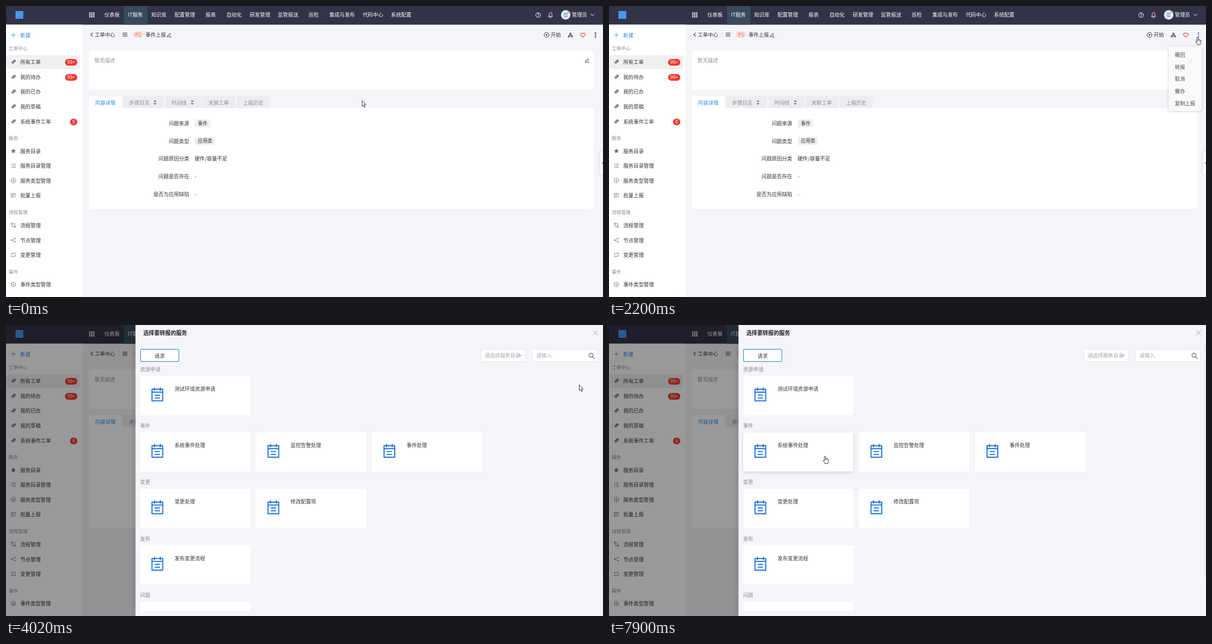
An HTML page with a canvas for the animation above (8 s loop, 1072 by 522 pixels).

```html
<!DOCTYPE html>
<html lang="zh-CN">
<head>
<meta charset="utf-8">
<title>工单中心</title>
<style>
html, body { margin: 0; width: 100%; height: 100%; overflow: hidden; background: #f4f5f9; }
canvas { display: block; }
</style>
</head>
<body>
<canvas id="stage" width="1072" height="522"></canvas>
<script>
const ctx = document.getElementById('stage').getContext('2d');
const LOOP = 8000, MENU_AT = 1960, DRAWER_AT = 4020;
const FONT = '"Noto Sans CJK SC", "Noto Sans CJK", "Noto Sans", sans-serif';
const INK = '#333', GRAY = '#8a8c90', BLUE = '#2d84e8', BG = '#f4f5f9', RED = '#f0372e';

function text(s, x, y, color = INK, size = 9.17, align = 'left', weight = 400) {
  ctx.font = `${weight} ${size}px ${FONT}`;
  ctx.textAlign = align;
  ctx.fillStyle = color;
  ctx.fillText(s, x, y + size * 0.37);
}

function box(x, y, w, h, fill, r = 0, line) {
  ctx.beginPath();
  ctx.roundRect(x, y, w, h, r);
  ctx.fillStyle = fill;
  ctx.fill();
  if (line) {
    ctx.strokeStyle = line;
    ctx.lineWidth = 1;
    ctx.stroke();
  }
}

function shadowBox(x, y, w, h, fill, r, blur, alpha, dy = 1) {
  ctx.save();
  ctx.shadowColor = `rgba(0,0,0,${alpha})`;
  ctx.shadowBlur = blur;
  ctx.shadowOffsetY = dy;
  box(x, y, w, h, fill, r);
  ctx.restore();
}

function dot(x, y, r, fill) {
  ctx.beginPath();
  ctx.arc(x, y, r, 0, Math.PI * 2);
  ctx.fillStyle = fill;
  ctx.fill();
}

// Path around (x, y): outlined, filled, or both
function icon(d, x, y, stroke, width = 1, fill) {
  const p = new Path2D(d);
  ctx.save();
  ctx.translate(x, y);
  ctx.lineJoin = ctx.lineCap = 'round';
  if (fill) { ctx.fillStyle = fill; ctx.fill(p); }
  if (stroke) { ctx.strokeStyle = stroke; ctx.lineWidth = width; ctx.stroke(p); }
  ctx.restore();
}

const ring = r => `M${r} 0A${r} ${r} 0 1 1 ${-r} 0A${r} ${r} 0 1 1 ${r} 0Z`;
const PENCIL = 'M-3 3.2L-2.6 1.2L1.6-3L3.2-1.4L-1 2.8ZM.6 3.6H3.8';
const ICON = {
  star: 'M0-4.3L1.3-1.5L4.3-1.2L2.1 .9L2.7 4L0 2.5L-2.7 4L-2.1 .9L-4.3-1.2L-1.3-1.5Z',
  list: 'M-4-3H-3.4M-1.8-3H4M-4 0H-3.4M-1.8 0H4M-4 3H-3.4M-1.8 3H4',
  bolt: ring(4.2) + 'M.5-2.2L-1.3 .4H1.2L-.4 2.4',
  batch: 'M3.6-.8V-3.4H-3.8V3.4H0M-2-1.2H1.5M-2 1H0M1 2.2L2.2 3.4L4.2 .8',
  flow: 'M-3.6-3.8H-1V-1.4H-3.6ZM1.2 1.6H3.8V4H1.2ZM.6-2.6H2.6V0M-2.4 .2V2.8H-.4',
  share: 'M3.4-3.2L-3 0L3.4 3.2M3-3.6H3.8V-2.8H3ZM-3.6-.5H-2.6V.5H-3.6ZM3 2.8H3.8V3.6H3Z',
  swap: 'M-3.4 .4V-2.6H3.4M2.2-3.8L3.6-2.6M3.4-.4V2.6H-3.4M-2.2 3.8L-3.6 2.6',
  hex: 'M0-4.2L3.7-2.1V2.1L0 4.2L-3.7 2.1V-2.1ZM-1.7-.8L0 .2L1.7-.8M0 .2V2'
};
const ARROW = 'M0 0V9.8L2.3 7.8L4 11.6L5.5 10.9L3.9 7.2L6.6 7Z';
const HAND = 'M-1.1 1Q0-.6 1.1 1V4.6Q6.2 4.8 6.2 7.4V9.4Q6 11 5 12.3V13.6H-.5V12.4L-3.3 8.8Q-3.6 6.8-2 7.2L-1.1 8.2Z';

const NAV = [['仪表板', 176.7], ['IT服务', 219], ['知识库', 260.7], ['配置管理', 302.7], ['报表', 358.3],
  ['自动化', 395.7], ['研发管理', 437.7], ['监管报送', 488.2], ['巡检', 543.3], ['集成与发布', 580.7],
  ['代码中心', 640.7], ['系统配置', 691.3]];
const SIDE = [['所有工单', 100, 'tag', '99+'], ['我的待办', 127, 'tag', '99+'], ['我的已办', 153.5, 'tag'],
  ['我的草稿', 180, 'tag'], ['系统事件工单', 207, 'tag', '6'], ['服务目录', 260, 'star'],
  ['服务目录管理', 286.5, 'list'], ['服务类型管理', 313, 'bolt'], ['批量上报', 339.7, 'batch'],
  ['流程管理', 393, 'flow'], ['节点管理', 420, 'share'], ['变更管理', 446.5, 'swap'], ['事件类型管理', 499.7, 'hex']];
const GROUPS = [['工单中心', 76], ['服务', 236.5], ['流程管理', 370], ['事件', 477]];
const TABS = [['内容详情', 149, 59], ['步骤日志', 210, 73, 267.5], ['时间线', 286, 64, 334.5],
  ['关联工单', 352.5, 59.5], ['上报历史', 414.5, 59.5]];
const FIELDS = [['问题来源', '事件', 28], ['问题类型', '应用类', 36], ['问题原因分类', '硬件/容量不足'],
  ['问题是否存在', '-'], ['是否为应用缺陷', '-']];
const MENU = ['撤回', '转报', '取消', '催办', '复制上报'];
const CATALOG = [['资源申请', ['测试环境资源申请']], ['事件', ['系统事件处理', '监控告警处理', '事件处理']],
  ['变更', ['变更处理', '修改配置项']], ['发布', ['发布变更流程']], ['问题', ['']]];
const CARD = { w: 197.5, h: 70 };
const cardX = i => 241 + i * 208.3, cardY = r => 91.5 + r * 101.2;

function topBar() {
  box(0, 0, 1072, 33.5, '#323346');
  box(212, 0, 42, 33.5, '#3a4a5d');
  box(17, 9, 14, 14, '#4896ee');
  for (let i = 0; i < 9; i++) box(149.3 + i % 3 * 3.6, 11.6 + Math.floor(i / 3) * 3.3, 2.4, 2.2, '#fff');
  NAV.forEach(([s, x]) => text(s, x, 16, '#fff'));
  icon(ring(4.2), 955.5, 16.3, '#fff');
  text('?', 955.5, 16.4, '#fff', 7, 'center', 700);
  icon('M-3.6 3H3.6L2.6 1.6V-1Q2.4-3.6 0-3.8Q-2.4-3.6-2.6-1V1.6ZM-1 4.8H1', 977.8, 16, '#fff');
  dot(979, 11.6, 1.7, RED);
  dot(1005, 16, 8.5, '#e3ecf9');
  text('管', 1005, 16.3, '#4a8de0', 8.5, 'center');
  icon('M-2.5 1.6L-2.2-1.6L-.6-.2L.6-2L1.4 0L2.8-.8L2.2 2Z', 1010.5, 10.5, null, 1, '#f2a63a');
  text('管理员', 1016, 16, '#fff');
  icon('M-3-1.5L0 1.7L3-1.5', 1053, 16, '#fff');
}

function sideBar() {
  box(0, 33.5, 137, 489, '#fff');
  icon('M-3.8 0H3.8M0-3.8V3.8', 13, 52, '#3d9be8', 0.9);
  text('新建', 25.6, 52.3, BLUE);
  box(1, 88, 132, 25, '#f0f0f1', 4);
  GROUPS.forEach(([s, y]) => text(s, 4.8, y, GRAY, 8.5));
  for (const [s, y, kind, badge] of SIDE) {
    if (kind === 'tag') {
      icon('M-4.2 1.2L.6-3.6L3.8-3.4L4.2-.6L-1 4Z', 13.3, y, null, 1, '#77797d');
      icon('M-2.4 .8L.4-2M-.8 2L2 -.8', 13.3, y, '#ddd', 0.6);
    } else if (kind === 'star') icon(ICON.star, 13.3, y, null, 1, '#6d6f73');
    else icon(ICON[kind], 13.3, y, '#77797d', 0.9);
    text(s, 25.7, y + 0.3);
    if (badge) {
      const w = badge.length > 1 ? 22 : 13;
      box(128 - w, y - 5, w, 12, RED, 6);
      text(badge, 128 - w / 2, y + 1, '#fff', 8.4, 'center');
    }
  }
}

function sorter(x, y) {
  icon('M-3-1.2L0-4.2L3-1.2ZM-3 1.2L0 4.2L3 1.2Z', x, y, null, 1, '#77797d');
}

function ticket(dotsColor) {
  icon('M1.8-3L-1.5 0L1.8 3', 153.7, 51.3, INK, 1.1);
  text('工单中心', 159.4, 51.6);
  box(202.5, 47, 0.8, 9, '#dcdde2');
  icon('M-3.8-2.7H3.8M-3.8 0H3.8M-3.8 2.7H3.8', 213.7, 51.4, INK, 1);
  box(228, 45.5, 18.5, 11.5, '#fcdcd8', 5.7);
  text('P1', 237.2, 51.3, '#ee6659', 9, 'center');
  text('事件上报', 250.5, 51.9);
  icon(PENCIL, 292.8, 52, INK);

  icon(ring(4.3), 970.6, 51.8, INK);
  icon('M-1.2-2L2 0L-1.2 2Z', 970.6, 51.8, null, 1, INK);
  text('开始', 978, 52);
  icon('M-1.2-3.6H1.2V-1.4H-1.2ZM-3.8 1.6H-1.6V3.6H-3.8ZM1.6 1.6H3.8V3.6H1.6ZM0-1.4V.2M-2.7 1.6V.2H2.7V1.6', 1013.6, 52.2, INK, 0.9);
  icon('M0 4L-3.8 .2C-5.6-2.2-2.2-5.4 0-2.4C2.2-5.4 5.6-2.2 3.8 .2Z', 1035.8, 52.2, '#f04b46', 1.1);
  for (const dy of [-3.6, 0, 3.6]) dot(1058.5, 52.1 + dy, 1.2, dotsColor);

  box(148.5, 80, 907.5, 70.5, '#fff', 5);
  text('暂无描述', 159, 97.7, GRAY);
  icon(PENCIL, 1043.4, 97.6, INK);

  box(148.5, 183, 907.5, 181, '#fff', [0, 5, 5, 5]);
  TABS.forEach(([s, x, w, sort], i) => {
    box(x, 161.5, w, 21.5, i ? '#ecedf0' : '#fff', [4, 4, 0, 0]);
    text(s, x + 11, 174, i ? GRAY : BLUE);
    if (sort) sorter(sort, 173);
  });
  FIELDS.forEach(([label, value, w], i) => {
    const y = 210.6 + i * 31.65;
    text(label, 328.8, y, INK, 9.17, 'right');
    if (w) box(339, y - 7.5, w, 15, '#efeff1', 2);
    text(value, w ? 344.6 : 338.7, y, INK, w ? 8.6 : 9.17);
  });

  shadowBox(1066, 261, 12, 42, '#f9fafc', 5, 4, 0.15, 0);
  icon('M1.6-2.4V2.4L-1.6 0Z', 1071.6, 282, null, 1, INK);
}

function menu(alpha, cursor) {
  ctx.save();
  ctx.globalAlpha = alpha;
  shadowBox(1005, 72.5, 59, 115.5, '#fff', 3, 5, 0.2);
  MENU.forEach((s, i) => {
    const y = 87.5 + i * 21.7;
    if (Math.abs(cursor.y - y) < 10.8) box(1005, y - 10.3, 59, 21.5, '#e6f1fc');
    text(s, 1016, y);
  });
  ctx.restore();
}

function calendar(x, y) {
  icon('M-9.6-9.2H9.6V11.6H-9.6ZM-9.6-4H9.6M-5.2-11.6V-7.4M5.2-11.6V-7.4', x, y, '#1a70e0', 1.9);
  icon('M-4 1.4H4M-4 6.4H4', x, y, '#1a70e0', 1.9);
}

function hoveredCard({ x, y }) {
  for (let r = 0; r < CATALOG.length; r++)
    for (let i = 0; i < CATALOG[r][1].length; i++)
      if (x > cardX(i) && x < cardX(i) + CARD.w && y > cardY(r) && y < cardY(r) + CARD.h) return r * 10 + i;
  return -1;
}

function drawer(hover) {
  box(0, 0, 1072, 522, 'rgba(0,0,0,.4)');
  shadowBox(232.5, 0, 840, 522, BG, 0, 10, 0.2, 0);
  text('选择要转报的服务', 246.5, 14.2, '#222', 9.83, 'left', 700);
  icon('M-3.8-3.8L3.8 3.8M3.8-3.8L-3.8 3.8', 1058.5, 14, '#8f9196', 0.9);
  box(241.5, 43.5, 69, 22, '#fff', 1.5, '#2d7de0');
  text('请求', 276, 55.3, INK, 9.17, 'center');
  box(853, 43.5, 80, 22, '#fff', 2, '#e7e8ec');
  text('请选择服务目录', 859.7, 55, '#a2a4a9');
  icon('M-2.2-1.2L0 1.2L2.2-1.2', 923.5, 54.8, '#6f7176', 0.9);
  box(945.5, 43.5, 117, 22, '#fff', 2, '#e7e8ec');
  text('请输入', 952.5, 55, '#a2a4a9');
  icon('M2.2-1A3.6 3.6 0 1 1-5-1A3.6 3.6 0 1 1 2.2-1ZM1.3 1.7L4.6 5', 1051.8, 55.2, '#5c5e63', 1.1);

  ctx.save();
  ctx.beginPath();
  ctx.rect(233, 68, 839, 445);
  ctx.clip();
  CATALOG.forEach(([name, cards], r) => {
    const y = cardY(r);
    text(name, 240.7, y - 11.8, GRAY);
    cards.forEach((s, i) => {
      const x = cardX(i);
      if (hover === r * 10 + i) shadowBox(x, y, CARD.w, CARD.h, '#fff', 2, 6, 0.14, 2);
      else box(x, y, CARD.w, CARD.h, '#fff', 2);
      if (!s) return;
      calendar(x + 30.8, y + 33);
      text(s, x + 61.7, y + 23.2);
    });
  });
  ctx.restore();
  box(1070.5, 36, 1.5, 416, '#e3e5ea');
}

// Cursor moves: start, end, steps, target x, y
const MOVES = [
  [70, 790, 10, 985, 85], [880, 1300, 7, 1065, 62], [1370, 1510, 3, 1056.5, 55], [1580, 1650, 2, 1058, 54],
  [1960, 2450, 7, 1055, 58.5], [2830, 3390, 8, 1030, 108.5], [4020, 4020, 1, 1029.5, 107.8],
  [5420, 6200, 11, 560.5, 202], [6280, 6590, 5, 400.5, 224.5], [6660, 6660, 1, 394.5, 227],
  [6820, 7050, 4, 393, 228], [7520, 7520, 1, 392.5, 228], [7670, 7900, 4, 388, 235]
];
const ease = p => p < 0.5 ? 2 * p * p : 1 - 2 * (1 - p) ** 2;

function cursorAt(t) {
  let x = 639.5, y = 170;
  for (const [a, b, n, tx, ty] of MOVES) {
    if (t < a) break;
    const step = n > 1 ? Math.floor((t - a) / (b - a) * (n - 1) + 1e-6) : 0;
    const p = ease(Math.min(1, (step + 1) / n));
    x += (tx - x) * p;
    y += (ty - y) * p;
  }
  return { x, y };
}

function dotsColor(t) {
  if (t < 1510) return INK;
  if (t < 1580) return '#2f4f85';
  return t >= MENU_AT && t < 2900 ? '#5566d2' : '#2a76e0';
}

function draw(t) {
  const cursor = cursorAt(t);
  let hand;
  box(0, 0, 1072, 522, BG);
  topBar();
  sideBar();
  ticket(dotsColor(t));
  if (t < DRAWER_AT) {
    const open = t >= MENU_AT;
    if (open) menu(Math.min(1, (t - MENU_AT + 70) / 350), cursor);
    hand = open || (cursor.x > 1052 && cursor.x < 1062 && cursor.y < 60);
  } else {
    const hover = hoveredCard(cursor);
    drawer(hover);
    hand = hover >= 0;
  }
  icon(hand ? HAND : ARROW, cursor.x, cursor.y, '#2b2c33', 0.9, '#fff');
  if (hand) icon('M1.1 4.6V7M2.9 5.2V7.2M4.6 5.6V7.4', cursor.x, cursor.y, '#2b2c33', 0.6);
}

const start = performance.now();
function tick() {
  draw((performance.now() - start) % LOOP);
  requestAnimationFrame(tick);
}
tick();
</script>
</body>
</html>
```
